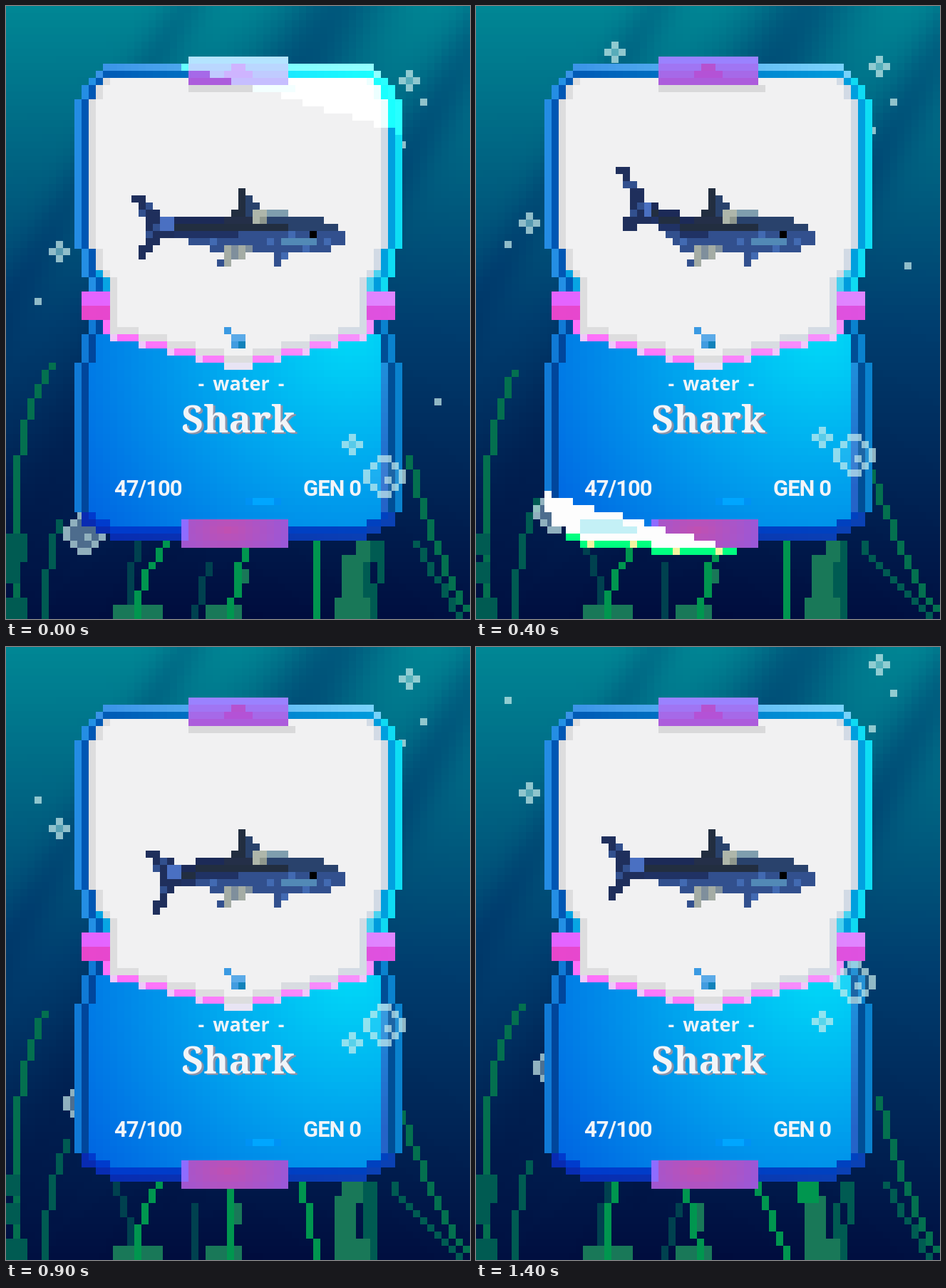
Animation, 651 px wide and 861 px high, one loop 1.5 s. Source, as an HTML page with a canvas:

```html
<!DOCTYPE html>
<html lang="en">
<head>
<meta charset="utf-8">
<title>Shark card</title>
<style>
  html, body { margin: 0; width: 100%; height: 100%; overflow: hidden; background: #003060; }
  canvas, svg { position: absolute; left: 0; top: 0; width: 100%; height: 100%; display: block; }
  text { fill: #f1f4f8; }
  .kind { font: 700 27px "Open Sans", sans-serif; word-spacing: 5px; }
  .name { font: 900 53px "Noto Serif", serif; }
  .name.back { fill: #8f93a8; }
  .info { font: 600 31px Roboto, sans-serif; letter-spacing: -1px; }
</style>
</head>
<body>
<canvas id="stage" width="651" height="861"></canvas>
<svg viewBox="0 0 651 861" preserveAspectRatio="none">
  <text class="kind" x="330" y="540" text-anchor="middle">- water -</text>
  <text class="name back" x="329" y="601" text-anchor="middle">Shark</text>
  <text class="name" x="326" y="599" text-anchor="middle">Shark</text>
  <text class="info" x="152" y="688">47/100</text>
  <text class="info" x="498" y="688" text-anchor="end">GEN 0</text>
</svg>
<script>
const W = 651, H = 861, COLS = 65, ROWS = 86, FRAME = 100, COUNT = 15;
const ctx = document.getElementById('stage').getContext('2d');
const { round, abs, min, max, hypot, floor } = Math;

function layer(paint) {
  const cv = document.createElement('canvas');
  cv.width = W; cv.height = H;
  paint(cv.getContext('2d'));
  return cv;
}
const rgb = c => `rgb(${c.map(round).join()})`;
const mix = (a, b, k) => a.map((v, i) => v + (b[i] - v) * max(0, min(1, k)));
const bump = v => Math.exp(-v * v);

// Each layer has its own grid of cells, snapped to whole pixels
const grid = (ox, oy, nudge) => (g, col, x, y, w = 1, h = 1) => {
  const px = v => round((v + ox) * W / COLS + nudge);
  const py = v => round((v + oy) * H / ROWS + nudge);
  g.fillStyle = col;
  g.fillRect(px(x), py(y), px(x + w) - px(x), py(y + h) - py(y));
};
const sea = grid(0, 0, 0), card = grid(9.5, 7, .45), fish = grid(17.5, 25.5, .3);

// Water darkens with depth and along slanted rays
const SHALLOW = [0, 134, 148], MIDDLE = [0, 61, 110], DEEP = [0, 11, 60];
function water(x, y) {
  const u = x + .6 * y, fade = 1 - y / H;
  const d = y + fade * (270 * bump((u - 455) / 75) + 130 * bump((u - 245) / 35)
    + 190 * bump((u - 680) / 45)) - 70 * abs(x / W - .5) * y / H;
  return d < 430 ? mix(SHALLOW, MIDDLE, d / 430) : mix(MIDDLE, DEEP, d / 430 - 1);
}
const backdrop = layer(g => {
  for (let y = 0; y < ROWS; y++)
    for (let x = 0; x < COLS; x++) sea(g, rgb(water(x * 10, y * 10)), x, y);
});

// Card outline: how far each row is cut in from the widest part
function inset(r) {
  if (r < 1 || r > 67) return 99;
  if (r < 6) return max(1, 5 - r);
  if (r > 63) return max(1, 2 * r - 129);
  const waist = abs(r - 34.5);
  return waist > 8 ? 0 : waist > 4 || waist < 2 ? 1 : 2;
}
const side = c => min(c, 45 - c);
const inCard = (c, r) => side(c) >= inset(r);
const inRibbon = (c, r) => c < 30 && (c > 15 && r >= 0 && r < 4 || c > 14 && r > 64 && r < 69);
const solid = (c, r) => inCard(c, r) || inRibbon(c, r);
const around = (c, r, test) => test(c - 1, r) || test(c + 1, r) || test(c, r - 1) || test(c, r + 1);
const edge = (c, r) => around(c, r, (a, b) => !inCard(a, b));
const rim = (c, r) => edge(c, r) ? 0 : around(c, r, edge) ? 1 : 2;
const vee = m => 38 + max(1, floor((m - 1) / 4));
const white = (c, r) => {
  const m = side(c);
  return r > 2 && r < vee(m) && m >= max(2, min(5, r - 26)) && rim(c, r) > 1;
};

function cardColor(c, r) {
  const m = side(c), k = c / 45, low = r > 36, ring = rim(c, r);
  if (abs(r - 34.5) < 2 && m < 5)
    return r < 35 ? mix([228, 98, 255], [224, 134, 255], k) : mix([232, 70, 204], [222, 82, 224], k);
  if (m === 4 && (r === 37 || r === 38) || m > 4 && r === vee(m)) {
    if (m > 20) return [232, 228, 244];
    return m % 4 === 1 ? [240, 200, 250] : mix([255, 106, 250], [246, 150, 252], k);
  }
  if (white(c, r)) {
    const open = white(c - 1, r) && white(c + 1, r) && white(c, r + 1);
    return open ? [241, 241, 242] : mix([221, 221, 222], [208, 218, 230], k * 2 - 1);
  }
  if (ring === 0) {
    if (r > 63) return mix([8, 42, 178], [10, 66, 180], k);
    if (r < 3) return mix([52, 142, 230], [120, 210, 250], k * 1.1);
    return low ? mix([16, 122, 214], [10, 130, 206], k) : mix([36, 140, 228], [14, 222, 244], k);
  }
  if (ring === 1) {
    if (r > 63) return mix([0, 58, 206], [0, 66, 190], k);
    return low ? mix([0, 70, 156], [0, 78, 150], k) : mix([0, 84, 178], [0, 162, 224], k);
  }
  if (r < vee(m)) return mix([0, 160, 226], [80, 214, 240], k);
  if (c === 43) return mix([30, 150, 222], [36, 100, 200], (r - 40) / 20);
  return mix([0, 218, 248], [0, 98, 225], hypot(c - 38, r - 38) / 46);
}

const cardArt = layer(g => {
  for (let r = 1; r < 68; r++)
    for (let c = 0; c < 46; c++)
      if (inCard(c, r)) card(g, rgb(cardColor(c, r)), c, r);
  card(g, '#d9d9da', 16, 4, 15);
  for (let i = 0; i < 4; i++) {
    card(g, rgb(mix([154, 130, 255], [172, 92, 220], i / 3)), 16, i, 14);
    for (let c = 15; c < 30; c++)
      card(g, rgb(mix([192, 80, 178], [154, 88, 216], hypot((c - 21) / 9, (i - 1) / 5))), c, 65 + i);
  }
  card(g, '#b652d0', 22, 1, 2);
  card(g, '#b452d6', 21, 2, 4);
  card(g, '#8f6cff', 15, 65, 1, 3);
  // Water drop and small shimmer
  card(g, '#3a9ae2', 21, 38);
  card(g, '#5aaae8', 22, 39, 2);
  card(g, '#429ce0', 22, 40);
  card(g, '#1282ba', 23, 40);
  card(g, '#0092f4', 24, 62, 5);
  card(g, '#00a6ff', 25, 62, 3);
});

// Shark: outlines filled cell by cell; the tail bends and shortens
const BODY = [[4, 4.6], [6, 4], [26, 4], [30, 6], [30, 8], [27, 9], [13, 9], [9, 8], [8, 7], [4, 7]];
const FLUKE = [[0, 1], [1.2, 1], [5.2, 5], [5, 6], [3.2, 8], [2, 10], [1, 10], [1, 8], [2, 8],
  [2, 4], [1, 4], [1, 2], [0, 2]];
const DORSAL = [[15, 0], [16, 0], [18, 3], [22, 3], [22, 4], [14, 4], [14, 3], [15, 3]];
const PELVIC = [[13, 9], [16.2, 9], [13.8, 11], [12, 11], [12, 10], [13, 10]];
const PECTORAL = [[20, 9], [22, 9], [21, 11], [20, 11]];

function inside(pts, x, y) {
  let hit = false;
  pts.forEach(([ax, ay], i) => {
    const [bx, by] = pts[(i + 1) % pts.length];
    if (ay > y !== by > y && x < ax + (bx - ax) * (y - ay) / (by - ay)) hit = !hit;
  });
  return hit;
}
function skin(c, r) {
  if (c === 25 && r === 6) return '#000';
  if (r > 2 && r < 5 && abs(c - 17.5) < 1) return r + c > 21 ? '#8f988e' : '#aeb6aa';
  if (r === 3 && c > 17) return '#7f9eae';
  if (r > 7 && abs(c - 14.5) < 2) return c % 2 ? '#a4aca4' : '#7f8f9c';
  if (r === 7 && c > 20 && c < 26) return '#5289b6';
  if (c < 4) return (c + r) % 4 ? '#1f2f5c' : '#32508e';
  if (c < 6) return r < 6 ? '#4a70c2' : '#1f2f5c';
  if (r < 4) return c < 16 ? '#222e40' : '#29426c';
  if (r === 5 && c < 22) return '#222e40';
  if (r < 6) return c < 13 ? '#1c2a57' : c < 18 ? '#242f48' : '#29426c';
  if (r === 6 && c < 15) return '#203264';
  return (c * 3 + r) % 8 ? '#32508e' : '#426ab2';
}
const sharkCells = [];
for (let r = 0; r < 11; r++)
  for (let c = 0; c < 30; c++)
    if ([BODY, FLUKE, DORSAL, PELVIC, PECTORAL].some(p => inside(p, c + .5, r + .5)))
      sharkCells.push([c, r, skin(c, r)]);

function shark(t) {
  const beat = t >> 1, bend = beat % 4 === 2 ? -4 : beat === 4 ? 2 : 0;
  for (const [c, r, col] of sharkCells) {
    const k = r > 8 && c > 9 ? 0 : max(0, 1 - c / 12);
    fish(ctx, col, c + (bend ? round(2 * k) : 0), r + round(bend * k ** 1.3));
  }
}

// Seaweed: a stepped curve from root to tip, one cell per row
function weed(root, tip, top, bend, col) {
  let last = root;
  for (let y = ROWS - 1; y >= top; y--) {
    const k = (ROWS - 1 - y) / (ROWS - 1 - top);
    const x = round(root + (tip - root) * k ** bend);
    const from = min(x, last + (x > last));
    sea(ctx, col, from, y, max(1, abs(x - last)));
    last = x;
  }
}
function backWeeds(p) {
  const dim = '#00414f', deep = '#005b52', mid = '#04704f';
  weed(17, 18 - 3 * p, 75, 2, dim);
  weed(26, 28 - 2 * p, 78, 1, dim);
  weed(50, 51 - p, 75, 2, deep);
  weed(51, 52 - p, 75, 1, deep);
  weed(1, 6 - p * p, 50 + p, 5, mid);
  weed(5, 7 + p, 72 - 3 * p * p, 2, deep);
  weed(65, 56 - p, 63 + 2 * p * p, .7, mid);
  weed(63, 57 - 3.5 * p, 75, 1, deep);
  sea(ctx, deep, 0, 74, 3 - p, 4 - p);
  sea(ctx, deep, 0, 78, 2, 3);
  sea(ctx, deep, 0, 83, 3, 3);
}
function frontWeeds(p) {
  const lit = '#00964f', base = '#197858', lean = min(p, 1);
  sea(ctx, base, 15, 84, 7, 2);
  sea(ctx, base, 28, 84, 5, 2);
  sea(ctx, base, 46, 83, 5, 3);
  sea(ctx, base, 47 - lean, 77, 3, 6);
  sea(ctx, p > 1 ? lit : base, 49 - 2 * p, 75, 2 + lean, 3);
  sea(ctx, base, 32 - p, 79 - lean, 2, 2 + p);
  weed(18, 22 - 1.5 * p, 75, 2, lit);
  weed(31, 33 - 2 * p, 75, 1, lit);
  weed(43, 43 - 2 * p, 75, 1, lit);
}

// Bubbles
const PALE = 'rgba(205,240,238,.7)', SOFT = 'rgba(160,225,228,.55)';
const dot = (x, y, col = PALE) => sea(ctx, col, x, round(y));
const rise = (y, speed, gain, n) => round(y - speed * n - gain * n * n);
function plus(x, y) {
  for (const d of [-1, 1]) {
    dot(x + 1 + d, y + 1);
    dot(x + 1, y + 1 + d);
  }
  dot(x + 1, y + 1, SOFT);
}
function ring(x, y, fill) {
  for (let j = 0; j < 6; j++)
    for (let i = 0; i < 6; i++) {
      const d = hypot(i - 2.5, j - 2.5);
      if (d < 2.7) dot(x + i, y + j, d > 2 || i === 3 && j === 3 ? PALE : fill);
    }
}
function backBubbles(t, s) {
  plus(6, 33 - t);
  plus(18, 13 - 2 * t);
  plus(55, 9 - 2 * s);
  dot(58, 13 - 3.4 * floor(t / 5));
  dot(55, 19 - 2 * s);
  dot(4, rise(41, 1.95, .032, t));
  dot(60, rise(55, 3.2, .4, t));
  ring(8, rise(71, 2.4, .33, s), 'rgba(140,175,195,.55)');
}
function frontBubbles(s) {
  plus(47, rise(60, .8, .35, s));
  ring(50, rise(63, 2.5, .56, s), 'rgba(200,240,255,.14)');
}

// Slanted glint sweeping down the card, flashing as it leaves
function glint(t) {
  const low = 46 + 161.7 * t + 8.9 * t * t, flash = t > 3;
  ctx.globalCompositeOperation = flash ? 'source-over' : 'lighter';
  for (let r = 0; r < 71; r++)
    for (let c = 0; c < 46; c++) {
      const y = 75 + 10 * r - low - 3 * (c - 2);
      if (y > 0 || y < -145) continue;
      if (solid(c, r)) {
        const cool = r > 64 && r < 67 && c > 4 && c < 13 && y > -135;
        card(ctx, flash ? (cool ? '#c4f0f6' : '#fdfdfd') : 'rgb(26,98,50)', c, r);
      } else if (flash && c > 2 && solid(c, r - 1)) {
        card(ctx, c % 6 === 0 ? '#f2f4a0' : '#00ff80', c, r);
      }
    }
  ctx.globalCompositeOperation = 'source-over';
}

function draw(t) {
  const s = floor(t / 3);
  ctx.drawImage(backdrop, 0, 0);
  backWeeds(2 - abs(2 - s));
  frontWeeds(floor(t / 5));
  backBubbles(t, s);
  ctx.drawImage(cardArt, 0, 0);
  shark(t);
  glint(t);
  frontBubbles(s);
}

const start = performance.now();
let last = -1;
function tick() {
  const t = floor((performance.now() - start) / FRAME) % COUNT;
  if (t !== last) draw(last = t);
  requestAnimationFrame(tick);
}
tick();
</script>
</body>
</html>
```
